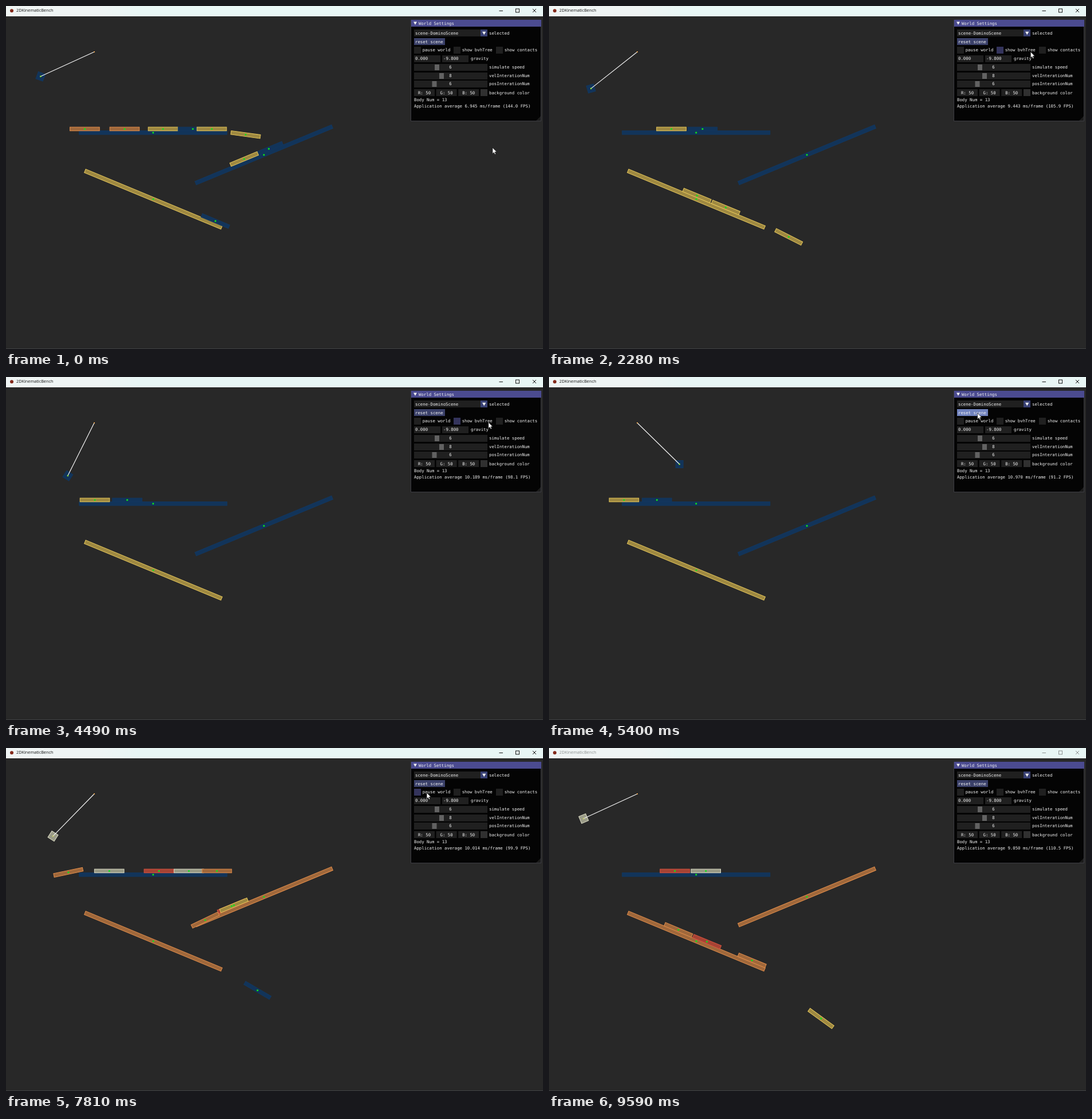
Write an HTML page with a canvas that moves like this. It is 937 by 598 pixels and loops after 9610 ms.

```html
<!DOCTYPE html>
<html lang="en">
<head>
<meta charset="utf-8">
<title>Domino scene</title>
<style>
  html, body { margin: 0; width: 100%; height: 100%; overflow: hidden; background: #282828; }
  canvas { display: block; width: 937px; height: 598px; }
</style>
</head>
<body>
<canvas id="stage" width="937" height="598"></canvas>
<script>
const ctx = document.getElementById('stage').getContext('2d');
const LOOP = 9610, RESET = 5480, EARLIER = 2060;
const RAD = Math.PI / 180, TILT = 22.5, SLOPE = Math.tan(TILT * RAD);
const PIVOT = { x: 154, y: 80 }, ROPE = 103;
const FLOOR = 214.4, LEFT_EDGE = 118, HALF_GRAVITY = 572;
const MONO = '7.35px "DejaVu Sans Mono", monospace';

// fill and outline
const PAINT = {
  blue: ['#12345a', '#12375f'],
  gold: ['#9f8941', '#e6c75a'],
  orange: ['#a0683b', '#e08c4a'],
  red: ['#a64334', '#d9523f'],
  white: ['#9a9b87', '#dcdcc6']
};

const clamp = u => Math.min(1, Math.max(0, u));
const mix = (a, b, u) => a + (b - a) * u;
const smooth = u => { u = clamp(u); return u * u * (3 - 2 * u); };

function linear(keys, t, col = 1) {
  let i = 0;
  while (i < keys.length - 2 && keys[i + 1][0] <= t) i++;
  const [a, b] = [keys[i], keys[i + 1]];
  return mix(a[col], b[col], clamp((t - a[0]) / (b[0] - a[0])));
}

// Tile colours are for the two runs. At 2.06 s a toppled tile is at `rest`, moving at `speed` px/s.
// Those leaving the floor on the right tip at `tip`, slide down the ramp, turn back at
// x = `back` at time `turn`, and have settled on the lower ramp by `settle`.
const tiles = [
  { paint: ['blue', 'blue'] },
  { paint: ['orange', 'orange'], rest: 137.5, speed: -140 },
  { paint: ['orange', 'white'], rest: 207, speed: -99 },
  { paint: ['gold', 'red'], rest: 274, speed: -26.5 },
  { paint: ['blue', 'white'], rest: 326, speed: -25.5 },
  { paint: ['gold', 'orange'], rest: 359, speed: 33, tip: 2.87, turn: 3.78, back: 320, settle: 4, pull: 312 },
  { paint: ['gold', 'red'], rest: 418, speed: 107, tip: 1.93, turn: 3.54, back: 241.6, settle: 3.15 },
  { paint: ['blue', 'gold'], rest: 464, speed: 150, tip: 1.7, turn: 3.28, back: 304, settle: 3.65, push: 247 },
  { paint: ['gold', 'orange'], rest: 415.5, speed: 33, tip: 1.7, turn: 3.55, back: 193, settle: 2.75 }
];

const rampY = x => 252.5 - SLOPE * (x - 450);

// Resting on the lower ramp, or flying off its right end.
function onLowerRamp(x) {
  const past = Math.max(0, x - 390);
  return { x, y: 330 + SLOPE * (x - 257) + .0072 * past * past, deg: TILT + .16 * past };
}

function firstTile(age) {
  const u = smooth((age - .58) / .52);
  const low = onLowerRamp(222 + 104 * (age - .887) ** 2);
  if (u === 1) return low;
  return {
    x: mix(154, u ? low.x : 154, u) - 55 * Math.sin(Math.PI * u),
    y: mix(191, low.y, u),
    deg: mix(-90, TILT, u)
  };
}

function fallLeft(x, age, tile) {
  const dt = age - 2.06 - (LEFT_EDGE - tile.rest) / tile.speed;
  if (dt < 0) return { x, y: FLOOR, deg: 0 };
  return { x: LEFT_EDGE - 70 * dt, y: FLOOR + 110 * dt ** 2 + 230 * dt ** 3, deg: -90 * dt };
}

function downRamps(floorX, lean, leanY, age, tile) {
  const { tip, turn, back, settle, pull = 104, push = pull } = tile;
  const slideX = back + (age < turn ? pull : push) * (age - turn) ** 2;
  const x = age < turn ? Math.min(floorX, slideX) : slideX;
  const dt = age - tip;
  const fallY = leanY + HALF_GRAVITY * dt * dt;
  const landed = clamp(1 - (rampY(x) - fallY) / 20);
  const deg = mix(lean + 60 * dt, -TILT, landed);
  const q = smooth((age - settle + .5) / .5);
  const low = onLowerRamp(x);
  return {
    x,
    y: mix(Math.min(fallY, rampY(x)), low.y, q),
    deg: mix(deg, low.deg, q ** 3) - 50 * q * (1 - q)
  };
}

function tilePose(tile, i, age) {
  if (i === 0) return firstTile(age);
  const hit = .5 + .08 * i;
  const lean = -90 * (1 - clamp((age - hit) / .93));
  const y = FLOOR + 23 * Math.sin(lean * RAD);
  const drift = tile.rest + tile.speed * (age - 2.06);
  const x = mix(154 + 28.4 * i, drift, smooth((age - hit) / (1.65 - hit)));
  if (tile.tip && age > tile.tip) return downRamps(x, lean, y, age, tile);
  if (tile.speed < -50 && age > 2) return fallLeft(x, age, tile);
  return { x, y, deg: lean };
}

function bobPose(t, run) {
  const [peak, period, spinStart] = run ? [6535, 2020, 6060] : [1040, 2050, -320];
  const reach = run && t < peak - period / 4 ? 90 : 65.5;
  const angle = reach * Math.cos(2 * Math.PI * (t - peak) / period) * RAD;
  return {
    x: PIVOT.x + ROPE * Math.sin(angle),
    y: PIVOT.y + ROPE * Math.cos(angle),
    deg: Math.max(0, t - spinStart) * (run ? .07 : .063)
  };
}

// [ms, x, y]
const pointer = [
  [0, 849, 247], [1300, 808, 199], [1850, 840, 80], [4700, 842, 79], [5200, 748, 63],
  [6880, 746, 63], [6980, 735, 77], [7900, 734, 78], [8640, 672, 241], [9550, 550, 600]
];
// [ms, average frame time]
const frameCost = [
  [0, 6.943], [1300, 9.576], [3440, 9.286], [5400, 10.97], [6980, 10.559], [8640, 9.47], [9590, 9.05]
];

function rect(x, y, w, h, color) {
  ctx.fillStyle = color;
  ctx.fillRect(x, y, w, h);
}

function poly(color, ...points) {
  ctx.beginPath();
  points.forEach(([x, y]) => ctx.lineTo(x, y));
  ctx.closePath();
  ctx.fillStyle = color;
  ctx.fill();
}

function line(color, width, ...points) {
  ctx.beginPath();
  points.forEach(([x, y]) => ctx.lineTo(x, y));
  ctx.strokeStyle = color;
  ctx.lineWidth = width;
  ctx.stroke();
}

function text(str, x, y, align = 'left', color = '#f2f2f2', font = MONO) {
  ctx.font = font;
  ctx.textAlign = align;
  ctx.textBaseline = 'middle';
  ctx.fillStyle = color;
  ctx.fillText(str, x, y);
}

function body({ x, y, deg }, w, h, paint) {
  const [fill, edge] = PAINT[paint];
  ctx.save();
  ctx.translate(x, y);
  ctx.rotate(deg * RAD);
  rect(-w / 2, -h / 2, w, h, fill);
  ctx.strokeStyle = edge;
  ctx.lineWidth = 1;
  ctx.strokeRect(-w / 2, -h / 2, w, h);
  ctx.restore();
}

const dot = ({ x, y }) => rect(x - 1.3, y - 1.3, 2.7, 2.7, '#10e818');

function drawWorld(t) {
  const run = t < RESET ? 0 : 1;
  const age = (run ? t - RESET : t + EARLIER) / 1000;
  const beams = [
    { x: 256.7, y: 220.8, deg: 0, paint: 'blue' },
    { x: 450, y: 259.5, deg: -TILT, paint: run ? 'orange' : 'blue' },
    { x: 257, y: 336.8, deg: TILT, paint: run ? 'orange' : 'gold' }
  ];
  const poses = tiles.map((tile, i) => tilePose(tile, i, age));
  const bob = bobPose(t, run);

  beams.forEach(beam => body(beam, 258, 6.5, beam.paint));
  poses.forEach((pose, i) => body(pose, 51.6, 6.5, tiles[i].paint[run]));
  body(bob, 13, 13, run ? 'white' : 'blue');
  line('#f4f4f4', 1.2, [PIVOT.x, PIVOT.y], [bob.x, bob.y]);

  [...beams, ...poses].forEach(dot);
  rect(bob.x - 1.2, bob.y - 1.2, 2.4, 2.4, run ? '#c8cf70' : '#8fdc30');
  rect(PIVOT.x - 1, PIVOT.y - 1, 2, 2, '#e0a050');
}

function drawTitleBar(t) {
  const ink = t > 9570 ? '#8c9090' : '#151515';
  const shade = ctx.createLinearGradient(0, 0, 937, 0);
  shade.addColorStop(.17, '#eff4f4');
  shade.addColorStop(.25, '#e8f6f5');
  rect(0, 0, 937, 18, shade);
  ctx.beginPath();
  ctx.arc(10, 8.3, 3, 0, 7);
  ctx.fillStyle = '#842a1c';
  ctx.fill();
  text('2DKinematicBench', 18, 8.5, 'left', ink, '7.3px "Open Sans", sans-serif');
  line(ink, 1, [860.5, 8.5], [867, 8.5]);
  ctx.strokeRect(889.5, 5, 6, 6);
  line(ink, 1, [919, 5], [925, 11]);
  line(ink, 1, [925, 5], [919, 11]);
}

function drawPanel(t, mx, my) {
  const over = (x, y, w, h) => mx >= x && mx < x + w && my >= y && my < y + h;
  const field = (x, y, w, reach = w) =>
    rect(x, y, w, 12, over(x, y, reach, 12) ? '#34345c' : '#202020');

  rect(707, 24, 227, 177, '#040404');
  ctx.strokeStyle = '#3c3c42';
  ctx.lineWidth = 1;
  ctx.strokeRect(706.5, 24.5, 227, 176);
  rect(707, 24, 227, 12, '#4b4b90');
  poly('#f2f2f2', [711, 27.5], [717, 27.5], [714, 32.8]);
  text('World Settings', 720, 30.7);

  field(712, 41, 116);
  rect(828, 41, 12, 12, '#3a4275');
  poly('#f2f2f2', [831, 44.8], [837.4, 44.8], [834.2, 50.2]);
  text('scene-DominoScene', 714, 47.9);
  text('selected', 843, 47.9);

  rect(712, 56, 54, 12, over(712, 56, 54, 12) ? '#7082bd' : '#3a4069');
  text('reset scene', 714, 62.7);

  [['pause world', 712, 64], ['show bvhTree', 781, 69], ['show contacts', 855, 74]].forEach(([name, x, reach]) => {
    field(x, 71, 12, reach);
    text(name, x + 14.7, 77.5);
  });

  field(712, 86, 46);
  field(761, 86, 46);
  text('0.000', 714, 92.3);
  text('-9.800', 763, 92.3);
  text('gravity', 811, 92.3);

  [['simulate speed', 6, 748], ['velInterationNum', 8, 756], ['posInterationNum', 6, 743.5]].forEach(([name, value, grab], i) => {
    const y = Math.round(101 + i * 14.7);
    field(712, y, 128);
    rect(grab, y + 1, 8, 10, '#626262');
    text(value, 775.5, y + 6.2, 'center');
    text(name, 843, y + 6.2);
  });

  ['R', 'G', 'B'].forEach((channel, i) => {
    const x = 712 + i * 38.6;
    field(x, 145, 36);
    text(channel + ': 50', x + 18, 151.6, 'center');
  });
  rect(828, 145, 12, 12, '#303030');
  text('background color', 843, 151.6);

  const cost = linear(frameCost, t);
  text('Body Num = 13', 712, 164.5);
  text(`Application average ${cost.toFixed(3)} ms/frame (${(1000 / cost).toFixed(1)} FPS)`, 712, 175.5);
  poly('#1c1c1c', [933, 192], [933, 200], [925, 200]);
}

function drawPointer(x, y) {
  const outline = [[0, 0], [0, 10.5], [2.4, 8.3], [4, 11.8], [5.6, 11], [4.1, 7.6], [7.2, 7.4]]
    .map(([dx, dy]) => [x + dx, y + dy]);
  poly('#ffffff', ...outline);
  line('#111111', .6, ...outline, outline[0]);
}

function draw() {
  const t = performance.now() % LOOP;
  const mx = linear(pointer, t, 1), my = linear(pointer, t, 2);
  rect(0, 0, 937, 598, '#282828');
  drawWorld(t);
  rect(0, 597, 937, 1, '#404243');
  drawTitleBar(t);
  drawPanel(t, mx, my);
  drawPointer(mx, my);
  requestAnimationFrame(draw);
}
draw();
</script>
</body>
</html>
```
